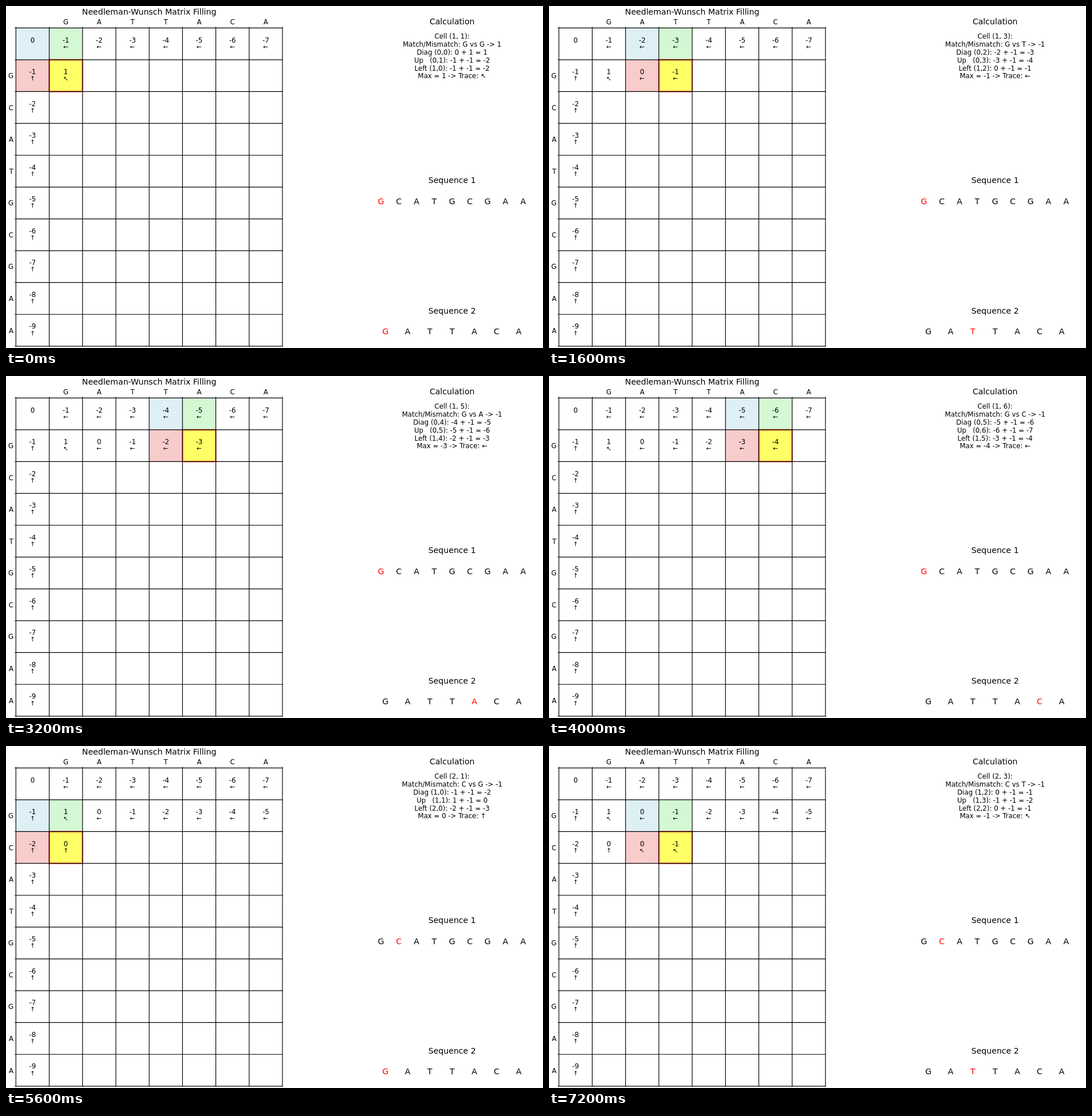
These frames come from a looping animation (938x597 px, 8 s). An HTML page with a canvas:

```html
<!DOCTYPE html>
<html lang="en">
<head>
<meta charset="utf-8">
<title>Needleman-Wunsch Matrix Filling</title>
<style>
html, body { margin: 0; width: 100%; height: 100%; overflow: hidden; background: #fff; }
canvas { display: block; }
</style>
</head>
<body>
<canvas id="stage" width="938" height="597"></canvas>
<script>
const ctx = document.getElementById('stage').getContext('2d');

const ROWS = 'GCATGCGAA', COLS = 'GATTACA';
const MATCH = 1, MISMATCH = -1, GAP = -1;
const STEP_MS = 800, STEPS = 10;

const PT = 1.175;
const SMALL = 10 * PT, LARGE = 12 * PT, ARROW = 9 * PT;
const GRID = { x: 17.3, y: 38.3, w: 58.2, h: 55.55 };
const PANEL = { x: 623.95, w: 310.5 };
const PANEL_MID = PANEL.x + PANEL.w / 2;

const colX = j => GRID.x + j * GRID.w;
const rowY = i => GRID.y + i * GRID.h;
const nRows = ROWS.length + 1, nCols = COLS.length + 1;

// Score every cell; ties prefer diagonal, then up, then left.
const cells = [];
for (let i = 0; i < nRows; i++) {
  cells.push([]);
  for (let j = 0; j < nCols; j++) {
    if (!i || !j) {
      cells[i].push({ score: (i + j) * GAP, arrow: i ? '↑' : j ? '←' : '' });
      continue;
    }
    const sub = ROWS[i - 1] === COLS[j - 1] ? MATCH : MISMATCH;
    const diag = cells[i - 1][j - 1].score + sub;
    const up = cells[i - 1][j].score + GAP;
    const left = cells[i][j - 1].score + GAP;
    const score = Math.max(diag, up, left);
    const arrow = score === diag ? '↖' : score === up ? '↑' : '←';
    cells[i].push({ score, arrow, sub, diag, up, left });
  }
}

function text(str, x, y, size, color = '#000', align = 'center') {
  ctx.font = `${size}px "DejaVu Sans", sans-serif`;
  ctx.textAlign = align;
  ctx.fillStyle = color;
  ctx.fillText(str, x, y);
}

function line(x1, y1, x2, y2, width) {
  ctx.lineWidth = width;
  ctx.beginPath();
  ctx.moveTo(x1, y1);
  ctx.lineTo(x2, y2);
  ctx.stroke();
}

function fillCell(i, j, color) {
  ctx.fillStyle = color;
  ctx.fillRect(colX(j), rowY(i), GRID.w, GRID.h);
}

function drawHighlights(i, j) {
  fillCell(i - 1, j - 1, '#deeff5');
  fillCell(i - 1, j, '#d3f8d3');
  fillCell(i, j - 1, '#f9cccc');
  fillCell(i, j, '#ffff66');
  ctx.strokeStyle = 'rgba(255,0,0,0.6)';
  ctx.lineWidth = 2.5;
  ctx.strokeRect(colX(j), rowY(i), GRID.w, GRID.h);
}

function drawGrid() {
  const tick = 2 * PT;
  ctx.strokeStyle = '#000';
  for (let j = 0; j <= nCols; j++) {
    line(colX(j), rowY(0) - 0.6, colX(j), rowY(nRows) + 0.6, PT);
    line(colX(j), rowY(0) - tick, colX(j), rowY(0), 0.6 * PT);
  }
  for (let i = 0; i <= nRows; i++) {
    line(colX(0) - 0.6, rowY(i), colX(nCols) + 0.6, rowY(i), PT);
    line(colX(0) - tick, rowY(i), colX(0), rowY(i), 0.6 * PT);
  }
  text('Needleman-Wunsch Matrix Filling', colX(nCols / 2), 15.2, LARGE);
  [...COLS].forEach((c, j) => text(c, colX(j + 1.5), 31.5, SMALL));
  [...ROWS].forEach((c, i) => text(c, 13, rowY(i + 1.5) + 4.5, SMALL, '#000', 'right'));
}

function drawScores(row, col) {
  for (let i = 0; i < nRows; i++) {
    for (let j = 0; j < nCols; j++) {
      const filled = !i || !j || i < row || (i === row && j <= col);
      if (!filled) continue;
      const { score, arrow } = cells[i][j];
      text(String(score), colX(j + 0.5), rowY(i) + 25.2, SMALL);
      text(arrow, colX(j + 0.5), rowY(i) + 36.3, ARROW);
    }
  }
}

function drawCalculation(i, j) {
  const c = cells[i][j];
  const sum = (a, b, gain, total) => `(${a},${b}): ${cells[a][b].score} + ${gain} = ${total}`;
  text('Calculation', PANEL_MID, 31.6, LARGE);
  [
    `Cell (${i}, ${j}):`,
    `Match/Mismatch: ${ROWS[i - 1]} vs ${COLS[j - 1]} -> ${c.sub}`,
    `Diag ${sum(i - 1, j - 1, c.sub, c.diag)}`,
    `Up   ${sum(i - 1, j, GAP, c.up)}`,
    `Left ${sum(i, j - 1, GAP, c.left)}`,
    `Max = ${c.score} -> Trace: ${c.arrow}`
  ].forEach((str, k) => text(str, PANEL_MID, 57.4 + 13.8 * k, SMALL));
}

function drawSequence(title, seq, active, titleY, seqY) {
  text(title, PANEL_MID, titleY, LARGE);
  [...seq].forEach((c, k) => {
    const x = PANEL.x + PANEL.w * (k + 1) / (seq.length + 1);
    text(c, x, seqY, LARGE, k === active ? '#f00' : '#000');
  });
}

function draw(now) {
  const step = Math.floor(now / STEP_MS) % STEPS;
  const i = 1 + Math.floor(step / COLS.length);
  const j = 1 + step % COLS.length;
  ctx.fillStyle = '#fff';
  ctx.fillRect(0, 0, 938, 597);
  drawHighlights(i, j);
  drawGrid();
  drawScores(i, j);
  drawCalculation(i, j);
  drawSequence('Sequence 1', ROWS, i - 1, 309.2, 345.9);
  drawSequence('Sequence 2', COLS, j - 1, 536.6, 572.8);
}

const start = performance.now();
function loop() {
  draw(performance.now() - start);
  requestAnimationFrame(loop);
}
loop();
</script>
</body>
</html>
```
